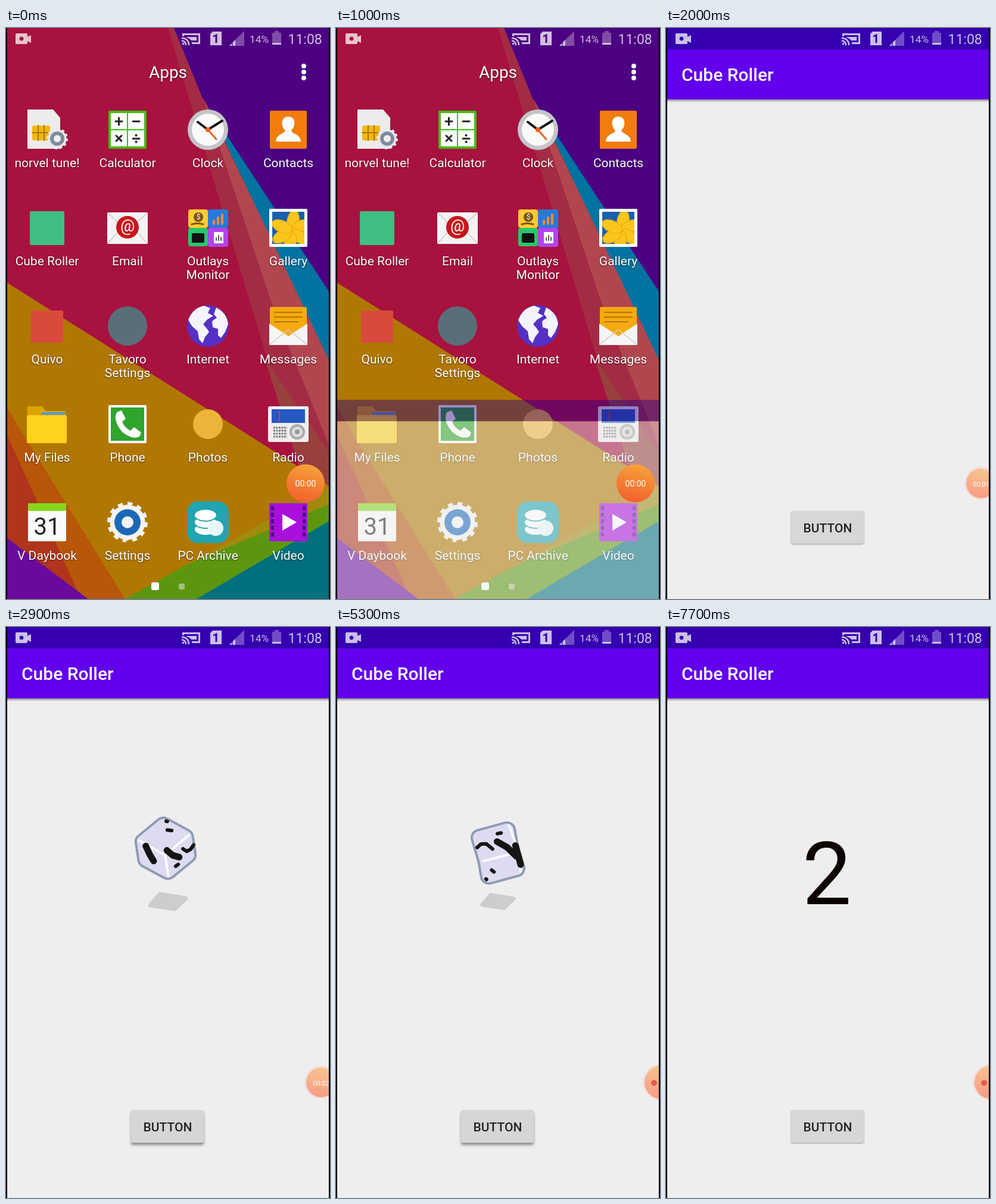
These frames come from a looping animation (544 by 960 pixels, 8000 ms). An HTML page:

```html
<!DOCTYPE html>
<html lang="en">
<head>
<meta charset="utf-8">
<title>Dice roll on a phone</title>
<style>
html, body { margin: 0; width: 100%; height: 100%; overflow: hidden; background: #000; }
svg { display: block; width: 100vw; height: 100vh; font-family: Roboto, "Noto Sans", sans-serif; }
.label { font-size: 21px; fill: #fff; text-anchor: middle; filter: drop-shadow(0 1px 1px #0009); }
.mid { text-anchor: middle; }
.hand { fill: none; stroke-linecap: round; }
#button { filter: drop-shadow(0 1px 1px #0006); }
#button.down { filter: drop-shadow(0 4px 2px #0006); }
</style>
</head>
<body>
<svg viewBox="0 0 544 960">
  <defs>
    <clipPath id="screen"><path d="M2 0H542V960H2z"/></clipPath>
    <linearGradient id="orange" x1=".65" y1="0" x2=".4" y2="1">
      <stop offset="0" stop-color="#f6a23a"/><stop offset="1" stop-color="#f2602c"/>
    </linearGradient>
    <linearGradient id="peach" x1=".65" y1="0" x2=".4" y2="1">
      <stop offset="0" stop-color="#f8c690"/><stop offset="1" stop-color="#f79c84"/>
    </linearGradient>
    <linearGradient id="shade" x1="0" y1="0" x2="0" y2="1">
      <stop offset="0" stop-color="#0006"/><stop offset="1" stop-color="#0000"/>
    </linearGradient>
  </defs>
  <g clip-path="url(#screen)">
    <g id="launcher">
      <path fill="#a8123f" d="M0 0H544V960H0z"/>
      <path fill="#a32c44" d="M272 0H292L335 125L544 620V775L488 722z"/>
      <path fill="#b2464e" d="M330 115L544 555V705L452 480z"/>
      <path fill="#98403e" d="M434 555L544 715V772L492 736z"/>
      <path fill="#0073a0" d="M328 108L544 440V562z"/>
      <path fill="#4c0082" d="M282 0H544V446L330 118z"/>
      <path fill="#b07800" d="M0 427L544 771V960H0z"/>
      <path fill="#b8560a" d="M0 636L200 960H0z"/>
      <path fill="#b0351c" d="M0 680L126 960H0z"/>
      <path fill="#6a0a9c" d="M0 856L138 960H0z"/>
      <path fill="#a08a10" d="M544 770V834L290 910z"/>
      <path fill="#5c960f" d="M200 960L300 904L544 800V830L322 960z"/>
      <path fill="#00707e" d="M544 828V960H320z"/>
      <text class="label" x="272" y="84" style="font-size:28px">Apps</text>
      <g fill="#fff"><circle cx="500" cy="64" r="4"/><circle cx="500" cy="74" r="4"/><circle cx="500" cy="84" r="4"/></g>
      <g id="icons"></g>
      <rect x="244" y="932" width="13" height="13" rx="3" fill="#fff"/>
      <rect x="290" y="934" width="10" height="10" rx="3" fill="#a9bd86"/>
    </g>
    <g id="panel">
      <path fill="#3500b0" d="M0 0H544V36H0z"/>
      <path fill="#000" opacity=".25" id="dim" d="M0 0H544V36H0z"/>
      <path fill="#eee" d="M0 36H544V960H0z"/>
    </g>
    <g id="app">
      <path fill="#6200ee" d="M0 36H544V120H0z"/>
      <path fill="url(#shade)" d="M0 120H544V125H0z"/>
      <text x="26" y="89" font-size="30" font-weight="500" fill="#fff">Cube Roller</text>
      <text id="number" class="mid" x="270" y="466" font-size="147" fill="#0c0202"></text>
      <g id="die" stroke-linejoin="round" stroke-linecap="round">
        <path id="shadow" fill="#cdcdcd" stroke="#cdcdcd" stroke-width="8" d="M-13-12L29-5L11 12L-29 6z"/>
        <path id="rim" fill="#8f9bb3" stroke="#8f9bb3" stroke-width="30"/>
        <path id="body" fill="#dcdbf0" stroke="#dcdbf0" stroke-width="22"/>
        <path id="edges" fill="none" stroke="#fafaff" stroke-width="4"/>
        <path id="bigPips" fill="none" stroke="#151515" stroke-width="11"/>
        <path id="smallPips" fill="none" stroke="#151515" stroke-width="6"/>
      </g>
      <g id="button">
        <rect id="face" x="210" y="812" width="122" height="55" rx="3" fill="#d6d7d7"/>
        <text class="mid" x="271.5" y="848" font-size="21" font-weight="500" fill="#222">BUTTON</text>
      </g>
    </g>
    <g fill="#fff" opacity=".75">
      <path fill-rule="evenodd" d="M18 9H34Q36 9 36 11V15L42 12V25L36 22V25Q36 27 34 27H18Q16 27 16 25V11Q16 9 18 9zM26 14.500a3.500 3.500 0 1 0 .1 0z"/>
      <path d="M296 14V9H326V27H312V24H323V12H299V14zM303 15H320V21H311Q308 17 303 16z"/>
      <path class="hand" stroke="#fff" stroke-width="2.500" d="M296 17A11 11 0 0 1 307 28M296 21.500A6.500 6.500 0 0 1 302 28"/>
      <circle cx="297.500" cy="26.500" r="1.800"/>
      <path fill-rule="evenodd" d="M347 6H362V29H343V10zM354 10L348 13V15.500L351.500 14V25H354.500V10z"/>
      <path opacity=".4" d="M400 5V30H375z"/>
      <path d="M375 30L379 26V30zM381 24L385 20V30H381z"/>
      <path opacity=".4" d="M451 5H458V8H462V25H447V8H451z"/>
      <path d="M447 25H462V28H447z"/>
      <text x="409" y="25" font-size="17.300">14%</text>
      <text x="473.500" y="27" font-size="23">11:08</text>
    </g>
    <g id="bubble">
      <circle id="halo" r="33" fill="#f3d8d4" opacity=".6"/>
      <circle id="disc"/>
      <text id="clock" class="mid" y="5" fill="#fff"></text>
      <circle id="dot" cx="-12" cy="1" r="5" fill="#e85a50"/>
    </g>
  </g>
</svg>
<script>
const $ = id => document.getElementById(id);
const show = (id, on) => $(id).style.display = on ? "" : "none";
const set = (id, attrs) => { for (const k in attrs) $(id).setAttribute(k, attrs[k]); };
const clamp = x => Math.min(1, Math.max(0, x));

// icon parts, centred on 0,0
const box = (x, y, w, h, fill, rx = 0) => `<rect x="${x}" y="${y}" width="${w}" height="${h}" rx="${rx}" fill="${fill}"/>`;
const disc = (x, y, r, fill) => `<circle cx="${x}" cy="${y}" r="${r}" fill="${fill}"/>`;
const shape = (d, fill) => `<path d="${d}" fill="${fill}"/>`;
const line = (d, color, w) => `<path class="hand" d="${d}" stroke="${color}" stroke-width="${w}"/>`;
const word = (x, y, size, s, fill, weight = 400) =>
  `<text class="mid" x="${x}" y="${y}" font-size="${size}" font-weight="${weight}" fill="${fill}">${s}</text>`;
const gear = (x, y, r, fill) => disc(x, y, r * .87, fill) +
  `<circle cx="${x}" cy="${y}" r="${r * .9}" fill="none" stroke="${fill}" stroke-width="${r * .2}" pathLength="24" stroke-dasharray="1"/>`;
const petal = a => `<ellipse cx="17" rx="18" ry="10" fill="#fbc51d" stroke="#e8a400" transform="translate(5 5) rotate(${a})"/>`;
const holes = x => [-27, -16, -5, 6, 17].map(y => box(x, y, 5, 7, "#4a0878")).join("");

const apps = [
  ["norvel tune!", shape("M-33-34H10L22-20V32H-33z", "#ececec") + box(-25, -7, 30, 25, "#f2b80c", 3) +
    line("M-15-7V18M-5-7V18M-25 5H5", "#a87800", 2) + gear(17, 15, 18, "#e6e9ee") + disc(17, 15, 12, "#7f8b9c") + disc(17, 15, 6, "#eee")],
  ["Calculator", box(-32, -32, 64, 64, "#42bc10", 2) + box(-28, -28, 27, 27, "#fff") + box(1, -28, 27, 27, "#fff") +
    box(-28, 1, 27, 27, "#fff") + box(1, 1, 27, 27, "#fff") +
    line("M-20-14H-9M-14.500-20V-8M9-14H20M-19 10L-10 19M-10 10L-19 19M9 15H20", "#222", 3) + disc(14.5, 9.5, 2, "#222") + disc(14.5, 20.5, 2, "#222")],
  ["Clock", disc(0, 0, 34, "#c4c5ca") + disc(0, 0, 27, "#fafafa") + line("M0 0L14 16", "#f2601c", 3) +
    line("M-17-13L0 0L24-15", "#111", 4) + disc(0, 0, 4, "#f2601c")],
  ["Contacts", box(-31, -32, 62, 64, "#f27c0c", 2) +
    shape("M0-22C14-22 12-4 5 1C5 7 21 7 21 20H-21C-21 7-5 7-5 1C-12-4-14-22 0-22z", "#fff")],
  ["Cube Roller", box(-29, -28, 58, 57, "#3fbf82", 3)],
  ["Email", box(-34, -26, 68, 53, "#f4f4f4", 2) + line("M-33-25L0 6L33-25M-33 26L-10 0M33 26L10 0", "#ccc", 1.5) +
    disc(0, -1, 19, "#c8161d") + word(0, 6, 27, "@", "#fff")],
  ["Outlays|Monitor", box(-33, -31, 33, 31, "#ffcb2f", 4) + box(0, -31, 34, 31, "#2879dc", 4) + box(-33, 0, 33, 31, "#28c66b", 4) +
    box(0, 0, 34, 32, "#b044ee", 4) + disc(-16, -18, 8, "#7a5312") + word(-16, -14, 12, "$", "#fff") + line("M-27-6Q-18-9-8-6", "#7a5312", 3) +
    line("M10-7V-12M17-7V-17M24-7V-22", "#f48a35", 4) + box(-27, 9, 21, 16, "#111", 2) + box(10, 7, 16, 19, "#fff", 1) + line("M14 21V17M18 21V13M22 21V16", "#555", 2)],
  ["Gallery", box(-32, -32, 64, 64, "#fff", 2) + box(-27, -27, 54, 54, "#1760ad") +
    `<svg x="-27" y="-27" width="54" height="54" viewBox="-27 -27 54 54">${[-80, -25, 35, 95, 150, 205].map(petal).join("")}</svg>`],
  ["Quivo", box(-27, -26, 54, 54, "#d94a3d", 2)],
  ["Tavoro|Settings", disc(0, 0, 33, "#5a6e79")],
  ["Internet", disc(0, 0, 35, "#5630c4") +
    shape("M-33-10Q-25-31-6-34L4-30L0-22L9-17L-1-11L-8-3L-2 4L2 10L-5 19L-9 29L-15 22L-17 9L-27 0z", "#f4f4ff") +
    shape("M14-31Q32-22 34-3L29 10L22 20L17 16L17 5L8 2L7-8L15-14L10-20z", "#f4f4ff")],
  ["Messages", box(-31, -32, 62, 48, "#f5aa0e", 2) + line("M-23-23H23M-23-15H23M-23-7H16", "#b57500", 2) +
    shape("M-32-4L0 17L32-4V32H-32z", "#f5f5f5") + line("M-31 31L0 6L31 31", "#ccc", 1.5)],
  ["My Files", shape("M-33-30H-8L-2-22H31V10H-33z", "#dca400") + line("M-8-18H29", "#4b9be8", 4) + box(-34, -15, 67, 47, "#ffd21e", 2)],
  ["Phone", box(-32, -32, 64, 64, "#fff", 2) + box(-28, -28, 56, 56, "#2fa52c") +
    shape("M-18-20L-10-23L-3-9L-9-4Q-5 6 5 11L11 5L23 14L20 21Q8 27-9 13Q-25-6-18-20z", "#fff")],
  ["Photos", disc(0, 0, 25, "#eeb43a")],
  ["Radio", box(-34, -30, 68, 60, "#eee", 3) + box(-28, -25, 56, 23, "#2459c4") + line("M-15-22V-5", "#e33", 2) +
    `<path d="M-25 6H-2M-25 11H-2M-25 16H-2M-25 21H-2" stroke="#777" stroke-width="3" stroke-dasharray="3 1.500"/>` +
    disc(15, 13, 13, "#aaa") + disc(15, 13, 9, "#ddd") + disc(15, 13, 4, "#999")],
  ["V Daybook", box(-32, -32, 64, 64, "#fafafa", 2) + box(-32, -32, 64, 13, "#86d81c", 2) + word(0, 20.5, 40, "31", "#222")],
  ["Settings", gear(0, 0, 34, "#f4f4f4") + disc(0, 0, 22, "#1c69b8") + disc(0, 0, 10, "#f4f4f4")],
  ["PC Archive", box(-35, -35, 70, 70, "#21a5b0", 18) +
    [12, 0, -12].map(y => `<ellipse cx="-4" cy="${y}" rx="19" ry="10" fill="#fff" stroke="#21a5b0" stroke-width="2"/>`).join("") + disc(13, 10, 13, "#e8f8f8")],
  ["Video", box(-32, -32, 64, 64, "#a810dc", 2) + holes(-29) + holes(24) + shape("M-10-14L14 0L-10 14z", "#fff")]
];
$("icons").innerHTML = apps.map(([name, art], i) => {
  const x = 69 + i % 4 * 135, y = 171 + (i >> 2) * 165;
  const lines = name.split("|").map((s, n) => `<text class="label" y="${63 + 23 * n}">${s}</text>`).join("");
  return `<g transform="translate(${x} ${y})">${art}${lines}</g>`;
}).join("");

// cube edges from the corner nearest the viewer, and the axis they tumble about
const edges = [[44, -36, -28], [-48, -26, -31], [6, 39, -46]];
const axis = [.75, -.66, 0];
// smeared pips: the two edges of the face, then places along them
const bigPips = [[1, 2, .68, .06, .58, .36, .47, .57], [0, 2, .09, -.12, .26, .25, .47, .52]];
const midPips = [[0, 2, .64, .32, .76, .54, .9, .58, 1.02, .5], [0, 1, .74, .6, .79, .49]];
const dotPips = [[0, 2, .3, .76, .4, .77], [0, 1, .97, .85, .98, .82]];

function turn(v, angle) {
  const c = Math.cos(angle), s = Math.sin(angle), [x, y, z] = axis;
  const k = (v[0] * x + v[1] * y + v[2] * z) * (1 - c);
  return [
    v[0] * c + (y * v[2] - z * v[1]) * s + x * k,
    v[1] * c + (z * v[0] - x * v[2]) * s + y * k,
    v[2] * c + (x * v[1] - y * v[0]) * s + z * k
  ];
}

function drawDie(ms) {
  const angle = (ms - 200) / 400 * Math.PI;
  const lift = Math.sin(ms / 400 * Math.PI) ** 2;
  const cx = 272 - 4 * lift, cy = 380 - 8 * lift;
  const w = edges.map(v => turn(v, angle)).map(v => v[2] > 0 ? v.map(n => -n) : v);
  const at = (k, size = 1) => {
    const p = n => size * k.reduce((sum, f, i) => sum + (f - .5) * w[i][n], 0);
    return `${(cx + p(0)).toFixed(1)} ${(cy + p(1)).toFixed(1)}`;
  };
  const ring = [[1, 0, 0], [1, 1, 0], [0, 1, 0], [0, 1, 1], [0, 0, 1], [1, 0, 1]];
  const hull = "M" + ring.map(k => at(k, .76)).join("L") + "z";
  const pips = list => list.map(([i, j, ...uv]) => {
    const points = [];
    for (let n = 0; n < uv.length; n += 2) {
      const k = [0, 0, 0];
      k[i] = uv[n];
      k[j] = uv[n + 1];
      points.push(at(k));
    }
    return "M" + points.join("L");
  }).join("");
  set("rim", { d: hull });
  set("body", { d: hull });
  set("edges", { d: [0, 2, 4].map(n => `M${at([0, 0, 0])}L${at(ring[n], .92)}`).join("") });
  set("bigPips", { d: pips(bigPips) });
  set("smallPips", { d: pips(midPips) + pips(dotPips) });
  set("shadow", { transform: `translate(272 461.500) scale(${.9 + .1 * lift})` });
}

const rolls = [
  { press: 2600, end: 3900, value: 5 },
  { press: 4800, end: 5800, value: 1 },
  { press: 6600, end: 7700, value: 2 }
];

function drawBubble(t) {
  const faded = t >= 1500, docked = t >= 5000;
  const slide = clamp((t - 1500) / 500);
  const x = docked ? 546 : faded ? 510 + 19 * slide : 503;
  const r = docked ? 28 : faded ? 30 - 5 * slide : 32;
  set("bubble", { transform: `translate(${x} 765.500)` });
  set("disc", { r, fill: `url(#${faded ? "peach" : "orange"})` });
  set("halo", { r: r + 3 });
  show("halo", faded);
  show("dot", docked);
  show("clock", !docked);
  set("clock", { "font-size": faded ? 13.5 - 2.5 * slide : 14 });
  $("clock").textContent = "00:0" + (t < 1500 ? 0 : t < 2600 ? 1 : t < 3400 ? 2 : 3);
}

function draw(t) {
  const open = clamp((t - 800) / 500);
  show("launcher", open < 1);
  show("dim", open < 1);
  set("panel", { transform: `translate(0 ${960 * (1 - open ** 1.15)})`, opacity: open < 1 ? clamp(open * 1.13) : 1 });
  show("app", t >= 1600);

  const roll = rolls.findLast(r => t >= r.press);
  const last = rolls.findLast(r => t >= r.end);
  const rolling = roll && t >= roll.press + 100 && t < roll.end;
  show("die", rolling);
  if (rolling) drawDie(t - roll.press - 100);
  $("number").textContent = last && !rolling ? last.value : "";

  const down = roll && t < roll.press + 800;
  $("button").classList.toggle("down", !!down);
  set("face", { fill: down ? "#d5d7d6" : "#d7d7d7" });
  drawBubble(t);
}

// the screen updates ten times a second
function tick(now) {
  draw(Math.floor(now % 8000 / 100) * 100);
  requestAnimationFrame(tick);
}
draw(0);
requestAnimationFrame(tick);
</script>
</body>
</html>
```
